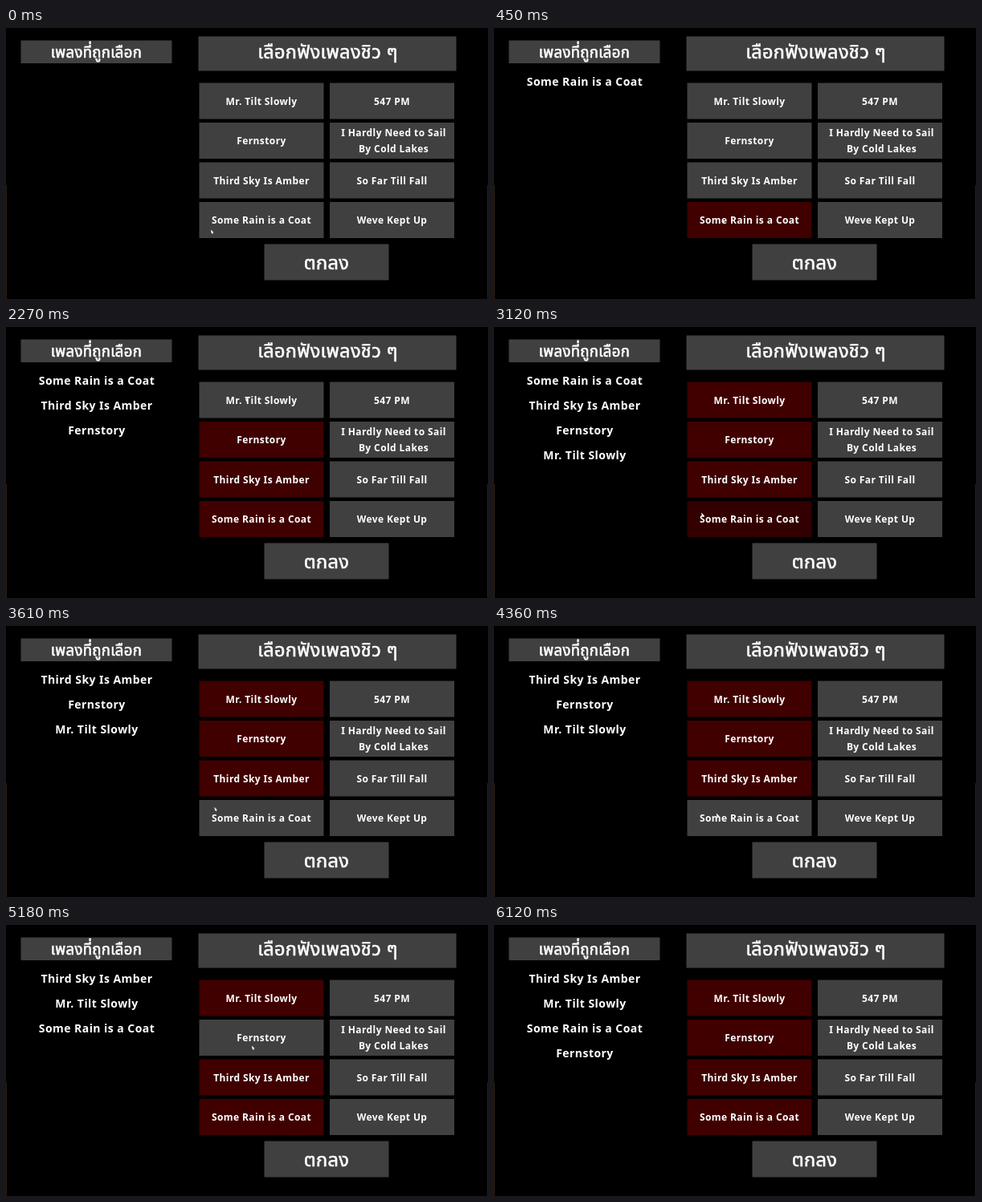
Animation, 600 px wide and 338 px high, one loop 6700 ms. Source, as an HTML page:

```html
<!DOCTYPE html>
<html lang="th">
<head>
<meta charset="utf-8">
<title>Playlist picker</title>
<style>
  html, body { margin: 0; width: 100%; height: 100%; overflow: hidden; background: #000; }
  svg { display: block; width: 100%; height: 100%; }
  text { fill: #fff; text-anchor: middle; font-family: "Noto Sans", "Noto Sans Thai", "Open Sans", sans-serif; }
  .box { fill: #404040; }
  .box.on { fill: #400000; }
  .box.pressed { filter: brightness(.78); }
  .song { font-size: 12px; font-weight: 600; letter-spacing: .4px; }
  .picked { font-size: 14px; font-weight: 700; letter-spacing: .45px; }
  .thai { font-family: "Noto Sans Thai", "Noto Sans", sans-serif; font-weight: 500;
          letter-spacing: .3px; stroke: #fff; stroke-width: .6px; }
</style>
</head>
<body>
<svg viewBox="0 0 600 338">
  <rect width="600" height="338"/>
  <path d="M.5 196V338M599.5 196V338" stroke="#2e1b0c"/>
  <g id="ui"></g>
  <path id="cursor" d="M-2-2.5 1.5 1 .5 1 1 2.5-.5 2.5-1.5 1Z" fill="#fff"/>
</svg>
<script>
const LOOP = 6700, PRESS = 60, EXIT = 6120;
const ui = document.getElementById('ui');
const cursor = document.getElementById('cursor');

const songs = [
  ['Mr. Tilt Slowly'], ['547 PM'],
  ['Fernstory'], ['I Hardly Need to Sail', 'By Cold Lakes'],
  ['Third Sky Is Amber'], ['So Far Till Fall'],
  ['Some Rain is a Coat'], ['Weve Kept Up']
];

// Cursor stops; those with a song press and toggle its button.
const stops = [
  { at: 0, x: 257, y: 254 },
  { at: 360, x: 285, y: 244, song: 6 },
  { at: 1040, x: 300, y: 190, song: 4 },
  { at: 1740, x: 301, y: 142, song: 2 },
  { at: 2080, x: 300, y: 90 },
  { at: 2440, x: 300, y: 91, song: 0 },
  { at: 3110, x: 260, y: 234, song: 6 },
  { at: 3560, x: 290, y: 236 },
  { at: 4240, x: 290, y: 236, orbit: true },
  { at: 4430, x: 274, y: 236, song: 6 },
  { at: 5000, x: 308, y: 153, song: 2 },
  { at: 5380, x: 308, y: 153, song: 2 },
  { at: 6030, x: 392, y: 291 },
  { at: EXIT, x: 392, y: 291 }
];

function add(tag, attrs, text = '') {
  const el = document.createElementNS('http://www.w3.org/2000/svg', tag);
  for (const key in attrs) el.setAttribute(key, attrs[key]);
  el.textContent = text;
  return ui.appendChild(el);
}

const box = (x, y, width, height) => add('rect', { class: 'box', x, y, width, height, rx: .5 });

function heading(x, y, size, text) {
  add('text', { class: 'thai', x, y, 'font-size': size }, text);
}

box(18.5, 15.5, 188, 28.5);
heading(112.5, 36.5, 18.6, 'เพลงที่ถูกเลือก');
box(239.5, 10.5, 321, 43);
heading(400.5, 37.5, 23.6, 'เลือกฟังเพลงชิว ๆ');
box(321.5, 269.5, 155, 45);
heading(399, 301, 23.6, 'ตกลง');

const buttons = songs.map((lines, i) => {
  const col = i % 2, y = 68.5 + Math.floor(i / 2) * 49.5;
  const button = box(240.5 + col * 162.5, y, 155, 45);
  lines.forEach((line, n) => add('text', {
    class: 'song',
    x: 318 + col * 162.5 + (lines.length - 1) * 2,
    y: y + 27.2 + (n - (lines.length - 1) / 2) * 19.5
  }, line));
  return button;
});

const slots = [0, 1, 2, 3].map(i => add('text', { class: 'picked', x: 113, y: 72 + i * 31 }));

function pickedAt(t) {
  const picked = new Set();
  for (const { at, song } of stops) {
    if (song !== undefined && at + PRESS <= t && !picked.delete(song)) picked.add(song);
  }
  return [...picked];
}

function pointAt(t) {
  const next = stops.findIndex(s => s.at > t);
  const a = stops[next - 1], b = stops[next];
  const k = (t - a.at) / (b.at - a.at);
  if (b.orbit) {
    const angle = k * 2 * Math.PI;
    return [b.x - 63 * Math.sin(angle), b.y - 70 * (1 - Math.cos(angle))];
  }
  const ease = k * k * (3 - 2 * k);
  return [a.x + (b.x - a.x) * ease, a.y + (b.y - a.y) * ease];
}

function draw(t) {
  const picked = pickedAt(t);
  const press = stops.find(s => t >= s.at && t < s.at + PRESS);
  buttons.forEach((button, i) => {
    button.classList.toggle('on', picked.includes(i));
    button.classList.toggle('pressed', press?.song === i);
  });
  slots.forEach((slot, i) => {
    slot.textContent = i < picked.length ? songs[picked[i]].join(' ') : '';
  });
  const visible = t < EXIT;
  cursor.setAttribute('visibility', visible ? 'visible' : 'hidden');
  if (visible) cursor.setAttribute('transform', `translate(${pointAt(t)})`);
}

const start = performance.now();
function tick() {
  draw((performance.now() - start) % LOOP);
  requestAnimationFrame(tick);
}
tick();
</script>
</body>
</html>
```
